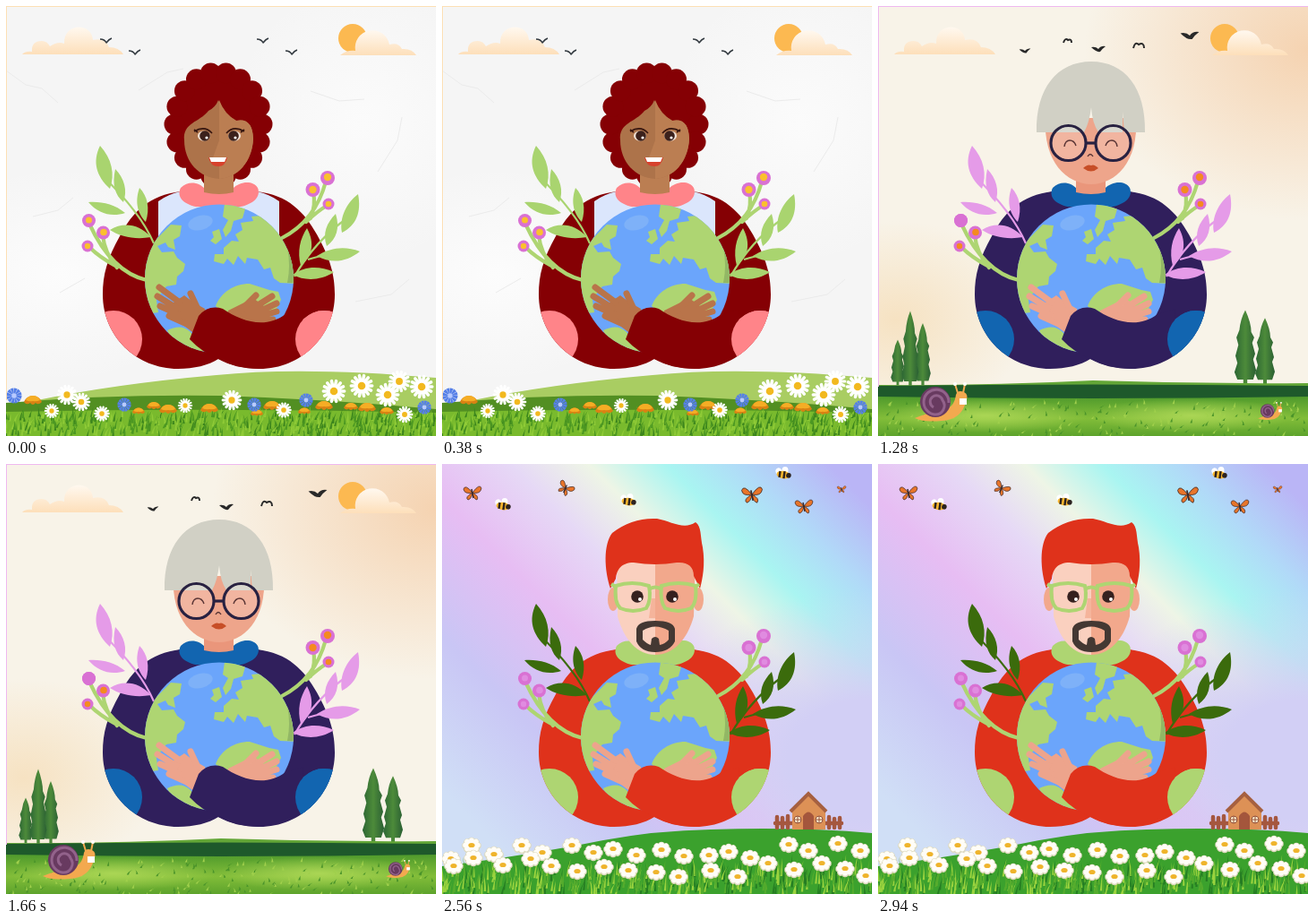
An HTML page that plays this animation: 480 by 480 pixels, repeating every 3.2 s.

```html
<!DOCTYPE html>
<html lang="en">
<head>
<meta charset="utf-8">
<title>Hugging the Earth</title>
<style>
html,body{margin:0;width:100%;height:100%;overflow:hidden}
svg{position:absolute;left:0;top:0}
.scene{width:480px;height:480px;opacity:0;animation:show 3.2s step-end infinite}
@keyframes show{0%{opacity:1}20%,100%{opacity:0}}
#s0{background:radial-gradient(170px 120px at 60px 300px,#fcfcfc,#fcfcfc00),radial-gradient(150px 160px at 400px 130px,#fbfbfb,#fbfbfb00),#f5f5f5;
 --body:#850004;--patch:#ff8489;--panel:#dbe6fc;--collar:#ff8489;--leaf:#a9d46f;--core:#fbc02d;--skin:#ad734a;--shade:#bb7e52;--hand:#b9744a}
#s1{animation-delay:-2.56s;background:radial-gradient(circle at 237px 20px,#fff 50px,#e4f2f4 130px,#b4dae0 220px,#86c3cd 310px,#60b0bd 420px);
 --body:#301f5c;--patch:#d6e4ff;--panel:#8eaab4;--collar:#d6e4ff;--leaf:#78a93a;--core:#f58a1f;--skin:#fad0bf;--shade:#f2ac90;--hand:#eda48c;--hair:#301f5c;--rim:#262a3b;--beard:#503a31}
#s2{animation-delay:-1.92s;background:radial-gradient(250px 190px at 480px 50px,#f5d3b1,#f5d3b100),radial-gradient(150px 110px at 20px 350px,#f6e2c2,#f6e2c200),#f8f3e8;
 --body:#301f5c;--patch:#1265b0;--panel:#301f5c;--collar:#1265b0;--leaf:#e59be8;--core:#f58a1f;--skin:#eea58b;--shade:#ea967b;--hand:#eda48c;--rim:#282141}
#s3{animation-delay:-1.28s;background:radial-gradient(270px 110px at 0 205px,#fdd0e4,#fdd0e400),radial-gradient(230px 120px at 430px 45px,#c2eee0,#c2eee000),radial-gradient(200px 130px at 480px 300px,#cbbcec,#cbbcec00),linear-gradient(175deg,#a8c6ec,#bcc6ee 42%,#dfd5f2 72%,#e8daf0);
 --body:#850004;--patch:#aed572;--panel:#d2521c;--collar:#aed572;--leaf:#3b6b0c;--core:#fbc02d;--skin:#eea58b;--shade:#ea967b;--hand:#eda48c;--rim:#87000c}
#s4{animation-delay:-.64s;background:radial-gradient(240px 190px at 470px 330px,#d2cff5 35%,#d2cff500),linear-gradient(45deg,#d0dff6 12%,#c9c6f5 30%,#e7bdf3 46%,#e6d9f6 58%,#eef5e6 67%,#a9f5f1 76%,#b1d9f8 85%,#bab5f6 95%);
 --body:#df321b;--patch:#aed572;--panel:#df321b;--collar:#aed572;--leaf:#3b6b0c;--core:#e08be0;--skin:#fad0bf;--shade:#f2a88c;--hand:#eda48c;--hair:#df321b;--rim:#aed572;--beard:#443833}
.body{fill:var(--body)}.patch{fill:var(--patch)}.panel{fill:var(--panel)}.collar{fill:var(--collar)}
.leaf{fill:var(--leaf)}.core{fill:var(--core)}.skin{fill:var(--skin)}.shade{fill:var(--shade)}
.hand{fill:var(--hand)}.fingers{fill:none;stroke:var(--hand);stroke-width:7;stroke-linecap:round}
.hair{fill:var(--hair)}.beard{fill:var(--beard)}
.rim{fill:none;stroke:var(--rim)}
.twig{fill:none;stroke:var(--leaf);stroke-width:2.2}
.stalk{fill:none;stroke:#aed572;stroke-width:4.2;stroke-linecap:round}
.berry{fill:#d971d3}
.gull{fill:none;stroke:#333a40;stroke-width:1.6;stroke-linejoin:round}
</style>
</head>
<body>
<svg width="0" height="0">
<defs>
<clipPath id="bodyClip"><path id="bodyShape" d="M195 207C160 211 141 230 127 257C113 282 108 300 108 322C108 369 146 405 192 405C210 405 226 401 237 394C250 401 264 405 283 405C330 405 367 368 367 322C367 300 362 282 347 255C333 230 315 211 280 207Z"/></clipPath>
<clipPath id="globeClip"><circle cx="238" cy="304.500" r="83"/></clipPath>
<linearGradient id="puff" x2="0" y2="1"><stop stop-color="#fff8ef"/><stop offset="1" stop-color="#fddfba"/></linearGradient>
<linearGradient id="lawnFill" x2="0" y2="1"><stop stop-color="#4f9a2c"/><stop offset=".55" stop-color="#82bd39"/><stop offset="1" stop-color="#5da32c"/></linearGradient>
<radialGradient id="glow"><stop stop-color="#b6dd5c" stop-opacity=".8"/><stop offset="1" stop-color="#b6dd5c" stop-opacity="0"/></radialGradient>
<linearGradient id="fir"><stop stop-color="#2c6634"/><stop offset=".5" stop-color="#4d8b3a"/><stop offset="1" stop-color="#2a5f33"/></linearGradient>

<g id="torso">
 <use href="#bodyShape" class="body"/>
 <g clip-path="url(#bodyClip)"><circle class="patch" cx="120" cy="372" r="32"/><circle class="patch" cx="355" cy="372" r="32"/></g>
 <path class="panel" d="M170 218Q181 210 195 207H280Q294 210 305 218V270H170Z"/>
 <path class="collar" d="M195 203C204 194 216 197 222 204Q238 211 253 204C262 195 276 195 281 203C285 213 276 221 262 224H212C198 221 190 213 195 203Z"/>
 <path class="shade" d="M221 185H254V208Q238 212 221 208Z"/>
</g>

<g id="hug">
 <path class="twig" d="M165 265Q150 230 108 190M130 231Q112 230 98 221M322 302Q345 262 382 236M337 283Q350 279 370 275"/>
 <path class="leaf" d="M105 156C96 174 101 190 116 204C122 188 118 170 105 156ZM122 182C118 200 122 211 131 219C136 206 132 192 122 182ZM92 219C106 218 121 221 133 231C118 236 103 232 92 219ZM149 203C143 220 148 233 156 241C161 226 158 212 149 203ZM116 250C131 241 148 243 162 258C145 261 128 258 116 250ZM393 210C397 230 391 245 375 253C372 236 380 220 393 210ZM368 232C373 248 369 260 358 268C353 254 358 242 368 232ZM395 274C380 286 363 288 347 279C363 269 379 268 395 274ZM336 248C345 265 342 280 329 290C325 274 328 260 336 248ZM366 297C351 307 333 307 320 300C334 290 350 290 366 297Z"/>
 <path class="stalk" d="M157 306Q118 297 93 243M108 256Q110 276 124 292M94 270Q104 280 122 290M308 259Q345 240 357 196M343 208Q346 222 340 237M358 223Q349 228 335 241"/>
 <g class="berry"><circle cx="92.500" cy="239.500" r="7.500"/><circle cx="108.500" cy="253" r="7.500"/><circle cx="91" cy="268" r="6.500"/><circle cx="359" cy="192" r="8"/><circle cx="342.500" cy="205" r="8"/><circle cx="360" cy="221" r="6.500"/></g>
 <g class="core"><circle cx="92.500" cy="239" r="3.500"/><circle cx="109" cy="252.500" r="3.800"/><circle cx="91" cy="268" r="3.200"/><circle cx="359" cy="191" r="4.200"/><circle cx="342.500" cy="205" r="4.200"/><circle cx="360" cy="221" r="3.300"/></g>
 <g clip-path="url(#globeClip)">
  <path fill="#6ba5fb" d="M150 215H325V392H150Z"/>
  <path fill="#aed572" d="M150 278L184 244L196 245L194 257L187 261L189 272L181 269L178 264L169 268L174 275L187 274L191 281L200 288L198 296L191 302L190 311L179 313L172 322L167 322L170 342L150 345Z
  M244 221L268 223L264 237L254 240L251 251L245 258L242 250L248 239L242 235ZM230 252L238 249L241 260L234 266L228 262L232 258Z
  M243 270L252 262L260 263L256 255L264 250L262 242L276 240L274 235L285 234L325 270V310L306 309L299 304L295 292L288 294L281 283L269 281L267 288L259 279L254 289L247 282L243 288L232 285L233 277L243 277Z
  M234 335C240 320 254 310 272 310L294 317L304 319L307 328L298 345L282 358L262 356L248 346ZM180 362Q196 354 206 364L223 385L206 388Q186 378 180 362Z"/>
  <ellipse cx="217" cy="242" rx="14" ry="8" fill="#7eb1f8" transform="rotate(-15 217 242)"/>
  <path fill="#92b765" d="M314 270Q318 290 314 309H325V270Z"/>
 </g>
 <path class="hand" d="M184 333L199 323L208 330L222 338L224 350L208 364Q190 352 184 333ZM248 340L276 326L292 338Q294 354 272 358L247 352Z"/>
 <path class="fingers" d="M171 314L194 331M169 324L190 337M172 335L192 344M182 346L202 355M206 321L214 338M297 324L270 341M302 332L272 346M302 341L272 350M298 350L268 354M279 323L262 340"/>
 <path class="body" d="M205 372L215 346Q226 333 242 338C262 352 290 361 312 344L332 338L330 390L283 405Q258 405 237 394Q218 386 205 372Z"/>
 <circle class="patch" cx="355" cy="372" r="32" clip-path="url(#bodyClip)"/>
</g>

<g id="openEyes"><g fill="#36211f"><circle cx="218" cy="148" r="6.800"/><circle cx="257" cy="148" r="6.800"/></g><g fill="#fff"><circle cx="221" cy="151" r="2"/><circle cx="260" cy="151" r="2"/></g></g>

<g id="man">
 <g class="shade"><ellipse cx="191" cy="151" rx="6" ry="13"/><ellipse cx="286" cy="151" rx="6" ry="13"/></g>
 <path class="skin" d="M195 104H238V213C218 213 203 196 196 170Z"/>
 <path class="shade" d="M238 104H283L281 170C274 196 258 213 238 213Z"/>
 <path class="hair" d="M188 139C181 118 180 90 190 77C205 65 222 60 240 61C256 64 270 74 283 65C290 70 288 80 291 93C294 112 291 128 288 139L281 125C281 114 274 109 262 110Q238 114 214 110C200 110 195 118 194 128Z"/>
 <use href="#openEyes"/>
 <path class="rim" stroke-width="4" d="M194 136Q212 130 231 136Q234 152 228 161Q213 167 199 161Q192 154 194 136ZM245 136Q264 130 283 136Q285 154 278 161Q264 167 249 161Q243 153 245 136ZM231 140Q238 135 245 140M189 134L195 138M287 134L282 138"/>
 <path class="shade" d="M234 150H238V172H231Z" opacity=".7"/>
 <path class="beard" fill-rule="evenodd" d="M217 184Q219 175 238 175Q258 175 260 184V198Q254 210 238 210Q222 210 217 198ZM224 186V196Q229 201 233 202L234 195Q238 191 242 195L243 202Q249 201 253 196V186Q238 177 224 186Z"/>
</g>

<path id="oval" class="skin" d="M187 125H288C291 174 265 199 238 199C211 199 184 174 187 125Z"/>
<g id="calm" fill="none">
 <g class="rim" stroke-width="3.200"><circle cx="212.500" cy="153" r="19.500"/><circle cx="262.500" cy="153" r="19.500"/><path d="M232 153H243"/></g>
 <g fill="#fff" opacity=".18"><circle cx="212.500" cy="153" r="18"/><circle cx="262.500" cy="153" r="18"/></g>
 <path stroke="#5a3535" stroke-width="1.400" d="M208 157Q209 150 214 150Q219 150 221 156M254 156Q256 150 261 150Q266 150 267 157M234 168Q237 163 240 168"/>
 <path fill="#c74e27" d="M229 181Q234 176 238 178Q241 176 246 181Q238 188 229 181Z"/>
</g>

<path id="cloud" fill="url(#puff)" d="M0 54Q4 50 11 51Q10 39 22 39Q28 39 31 45Q40 39 47 42C46 18 78 18 79 38Q93 35 97 46Q108 46 113 54Z"/>
<g id="dusk">
 <use href="#cloud" x="18"/>
 <circle cx="387" cy="36" r="16" fill="#fcb951"/>
 <path fill="url(#puff)" d="M373 55Q380 49 390 50A19 19 0 1 1 428 43Q438 40 442 48Q453 47 458 55Z"/>
</g>
<path id="gull" class="gull" d="M-7-2Q-2-2 0 2Q3-2 6-3"/>
<g id="gulls"><use href="#gull" x="287" y="39"/><use href="#gull" x="319" y="52"/></g>
<path id="crow" fill="#292929" d="M-8-2Q-3-3 0 0Q3-4 8-3Q4 0 2 3Q-2 4-8-2Z"/>

<g id="bee">
 <g fill="#fff"><ellipse cx="-3" cy="-5" rx="3.500" ry="4.500" transform="rotate(-25)"/><ellipse cx="2" cy="-5" rx="3.500" ry="4"/></g>
 <g transform="rotate(8)"><ellipse rx="7.500" ry="4.200" fill="#f9b62e"/><path stroke="#2c2320" stroke-width="2.400" d="M-4-3.500V3.500M1-4V4"/><circle cx="6" r="2.800" fill="#2c2320"/></g>
</g>
<g id="robin">
 <path fill="#54303a" d="M-28 9L-14 3Q-5-8 11-9Q22-12 24-4Q20 10 2 13Q-9 15-16 9L-27 14Z"/>
 <path fill="#7a3941" d="M7 2C0 4-12-2-17-14Q-4-13 4-8Z"/>
 <path fill="#d9533f" d="M14-9Q25-11 25-3Q21 9 10 10Q15 0 14-9Z"/><path fill="#eda02e" d="M24-8L29-6L24-4Z"/><circle cx="20" cy="-6" r="1.300" fill="#111"/>
</g>
<g id="moth"><path stroke="#3b2929" stroke-width=".7" d="M0 0Q-8-10-10-4Q-9 2 0 0Q-9 5-5 8Q-1 7 0 0Q8-11 10-5Q9 2 0 0Q8 4 5 8Q1 7 0 0Z"/><path stroke="#3b2929" stroke-width="1.500" d="M-1-4L1 6"/></g>

<g id="daisy"><path id="petals" stroke="#fff" stroke-width="2.700" stroke-linecap="round"/><circle r="3.300" fill="#f2b91f"/></g>
<g id="blossom" fill="none" stroke-linecap="round">
 <path id="bloom" stroke="#ddd9bd" stroke-width="7.500" d="M-7 0H7M0-5.500V5.500M-5-4L5 4M-5 4L5-4"/>
 <use href="#bloomTop"/><ellipse rx="3.600" ry="2.600" cy="-.5" fill="#efb42c"/>
</g>
<path id="bloomTop" stroke="#fffdf7" stroke-width="5.600" d="M-7-.5H7M0-6V5M-5-4.500L5 3.500M-5 3.500L5-4.500"/>
<g id="aster"><circle r="5.500" fill="none" stroke="#557fe8" stroke-width="8" pathLength="36" stroke-dasharray="2.600 .4"/><circle r="3" fill="#b8caff"/></g>
<g id="marigold"><path fill="#d98213" d="M-10 2Q-8-4 0-5Q8-4 10 2Q6 6 3 3Q0 7-3 3Q-7 6-10 2Z"/><path fill="#f5ad25" d="M-8 0Q-6-5 0-5Q6-5 8 0Q4 2 0 1Q-4 2-8 0Z"/></g>
<g id="meadow">
 <path fill="#a9cd62" d="M30 441Q120 422 235 412Q330 402 480 415V460H30Z"/>
 <path fill="#528f22" d="M0 443Q120 433 240 435Q360 439 480 450V480H0Z"/>
 <path fill="#79ba2d" d="M0 453Q240 448 480 454V480H0Z"/>
 <g id="meadowGrass"></g><g id="meadowFlowers"></g>
</g>

<g id="snail">
 <path fill="#f3a94f" d="M-30 18Q-10 10 4 8Q14 6 16-8Q18-14 25-11Q31-8 27 0Q22 20 0 21Q-20 23-30 18Z"/>
 <path stroke="#f3a94f" stroke-width="2" d="M18-10L15-20M24-10L26-20"/><g fill="#fff"><circle cx="15" cy="-20" r="2"/><circle cx="26" cy="-20" r="2"/></g>
 <circle cx="-7" cy="0" r="17" fill="#683a60"/><path fill="none" stroke="#92628b" stroke-width="3" d="M8 1A14 14 0 1 0-8 14A10 10 0 0 0 1-2A7 7 0 1 0-9 6"/>
 <path fill="#fff" d="M20-4H28V3H20Z"/>
</g>
<path id="tree" fill="url(#fir)" d="M0-80Q6-66 6-56L9-50L7-44L10-32L8-26L11-14L8-4H2V2H-2V-4H-8L-11-12L-8-22L-10-30L-7-42L-9-50L-6-58Q-5-70 0-80Z"/>

<g id="house">
 <path stroke="#a5573f" stroke-width="4.500" stroke-linecap="round" d="M-35 7V19M-29 8V19M-23 6V19M23 7V19M29 9V19M35 8V19M-37 14H-18M19 14H37"/>
 <path fill="#dd9156" d="M-18-1L0-19L19-1V21H-18Z"/>
 <path fill="none" stroke="#a66040" stroke-width="4" d="M-20 1L0-19L20 1"/>
 <path fill="#a4563c" d="M-6 21V6Q0-3 6 6V21Z"/>
 <g fill="#fff0d0" stroke="#93513a"><circle cx="-12" cy="10" r="4"/><circle cx="12" cy="10" r="4"/><path d="M-16 10H-8M-12 6V14M8 10H16M12 6V14"/></g>
</g>
</defs>
</svg>

<svg class="scene" id="s0" viewBox="0 0 480 480">
 <path fill="none" stroke="#ebebeb" d="M0 72L22 88L40 92L58 108M30 235L58 228L75 214M148 94L180 74L198 70M340 95L372 106L400 104M415 185L437 150L442 124M60 320L88 304M390 330L430 322L450 305"/>
 <use href="#dusk"/>
 <use href="#gulls"/><use href="#gulls" x="-175"/>
 <use href="#meadow"/>
 <g id="curls" fill="#850004"><ellipse cx="237" cy="132" rx="52" ry="61"/></g>
 <use href="#torso"/>
 <path class="skin" d="M199 150C197 130 216 130 226 117Q234 113 237 105Q244 121 257 128Q275 124 276 148C275 174 258 192 238 193C216 192 199 174 199 150Z"/>
 <path class="shade" d="M238 105Q244 121 257 128Q275 124 276 148C275 174 258 192 238 193V172H230L238 150Z"/>
 <g fill="#f3e4d8"><ellipse cx="221" cy="145" rx="7" ry="5.500"/><ellipse cx="255" cy="145" rx="7" ry="5.500"/></g>
 <g fill="#3b211c"><circle cx="222" cy="145" r="5.800"/><circle cx="254" cy="145" r="5.800"/></g><g fill="#fff"><circle cx="224" cy="147" r="1.600"/><circle cx="256" cy="147" r="1.600"/></g>
 <path fill="none" stroke="#35150f" stroke-width="1.600" d="M210 140Q222 133 230 142M246 142Q254 133 266 140M210 138L214 141M266 138L262 141"/>
 <path fill="#d7422d" d="M226 169H247Q245 179 237 179Q228 179 226 169Z"/><path fill="#fff" d="M227 169H246L244 174H229Z"/>
 <use href="#hug"/>
 <path fill="none" stroke="#fde0b5" stroke-width="2" d="M0 440V0H480"/>
</svg>

<svg class="scene" id="s1" viewBox="0 0 480 480">
 <use href="#bee" x="68" y="47"/><use href="#bee" x="208" y="42"/><use href="#bee" x="381" y="12"/>
 <use href="#robin" x="128" y="50"/><use href="#robin" transform="translate(452 27)scale(.5)"/>
 <g transform="translate(366 55)">
  <path id="rays" fill="#fbc64d" stroke="#e58a3e"/>
  <circle r="19" fill="#fdcf5d" stroke="#ec9f42"/>
  <g fill="#4b2c20"><circle cx="-7" cy="-2" r="1.800"/><circle cx="7" cy="-2" r="1.800"/></g><g fill="#f58c80"><circle cx="-11" cy="3" r="3"/><circle cx="11" cy="3" r="3"/></g><path d="M-3 1Q0 5 3 1" fill="none" stroke="#4b2c20"/>
 </g>
 <use href="#meadow"/><use href="#torso"/><use href="#man"/><use href="#hug"/>
</svg>

<svg class="scene" id="s2" viewBox="0 0 480 480">
 <use href="#dusk"/>
 <use href="#crow" transform="translate(164 50)scale(.8)"/><path d="M207 41Q209 35 212 38Q216 36 216 41M285 47Q287 39 291 43Q297 40 297 47" fill="none" stroke="#292929" stroke-width="2"/><use href="#crow" x="246" y="48"/><use href="#crow" transform="translate(348 33)scale(1.3)"/>
 <use href="#tree" transform="translate(22 422)scale(.7 .62)"/><use href="#tree" transform="translate(50 422)scale(.8 .85)"/><use href="#tree" transform="translate(36 423)scale(.85 1.030)"/>
 <use href="#tree" transform="translate(410 421)scale(1.100 1.020)"/><use href="#tree" transform="translate(432 421)scale(1 .91)"/>
 <path fill="#63a637" d="M0 423Q120 424 240 418Q360 422 480 421V440H0Z"/>
 <path fill="#1e592b" d="M0 424Q240 421 480 424V437Q240 440 0 437Z"/>
 <path fill="url(#lawnFill)" d="M0 436Q240 440 480 436V480H0Z"/>
 <ellipse cx="120" cy="457" rx="115" ry="19" fill="url(#glow)"/><ellipse cx="350" cy="457" rx="115" ry="19" fill="url(#glow)"/>
 <g id="lawnGrass"></g>
 <use href="#snail" transform="translate(71 442)"/><use href="#snail" transform="translate(438 452)scale(.46)"/>
 <use href="#torso"/><use href="#oval"/>
 <path fill="#d1d0c5" d="M177 141C176 92 200 62 238 62C276 62 299 92 298 141H275L273 118V141H246Q239 130 238 113Q236 130 230 141Z"/>
 <use href="#calm"/><use href="#hug"/>
 <circle class="berry" cx="92.500" cy="239.500" r="7.500"/>
 <path fill="none" stroke="#efb9f0" stroke-width="2" d="M0 425V0H480"/>
</svg>

<svg class="scene" id="s3" viewBox="0 0 480 480">
 <use href="#cloud" transform="translate(17 2)scale(.88 1)"/><use href="#cloud" transform="translate(362 2)scale(.88 1)"/>
 <use href="#gulls"/><use href="#gulls" x="-130"/>
 <use href="#moth" x="116" y="41" fill="#277ddb"/><use href="#moth" transform="translate(209 25)scale(.7)" fill="#d8472c"/><use href="#moth" transform="translate(344 51)scale(.75)" fill="#277ddb"/>
 <path fill="#c6d047" d="M0 441Q60 453 130 442L170 480H0Z"/>
 <path fill="#94b620" d="M0 461Q75 458 130 440Q205 410 300 408Q405 406 480 430V480H0Z"/>
 <g fill="#82a51c"><ellipse cx="344" cy="430" rx="20" ry="7"/><ellipse cx="310" cy="433" rx="8" ry="3"/><ellipse cx="275" cy="437" rx="12" ry="5"/><path d="M350 480Q410 432 480 445V480Z" opacity=".55"/></g>
 <use href="#house" x="382" y="398"/>
 <path id="tufts" fill="#329b68"/>
 <path fill="#e58a10" d="M177 150C174 95 195 62 238 62C281 62 300 95 298 150C303 183 325 188 319 222L305 245H170L157 222C149 192 174 186 177 150Z"/>
 <use href="#torso"/><use href="#oval"/>
 <path fill="#e58a10" d="M186 143C180 95 200 68 238 68C276 68 295 95 289 143L278 138L270 122L272 138H246Q240 126 238 111Q236 128 230 138H219L218 124L210 136Z"/>
 <use href="#calm"/><use href="#hug"/>
</svg>

<svg class="scene" id="s4" viewBox="0 0 480 480">
 <use href="#bee" x="68" y="47"/><use href="#bee" x="208" y="42"/><use href="#bee" x="381" y="12"/>
 <g fill="#e8752a"><use href="#moth" x="34" y="32"/><use href="#moth" transform="translate(138 27)rotate(35)scale(.9)"/><use href="#moth" transform="translate(346 34)scale(1.150)"/><use href="#moth" x="404" y="47"/><use href="#moth" transform="translate(446 28)scale(.5)"/></g>
 <path fill="#3ba12d" d="M0 449Q100 436 180 420Q240 409 300 408Q400 405 480 412V480H0Z"/>
 <use href="#house" x="409" y="387"/>
 <g id="fieldGrass"></g><g id="fieldFlowers"></g>
 <use href="#torso"/><use href="#man"/><use href="#hug"/>
</svg>

<script>
const el = id => document.getElementById(id);
let seed = 7;
const rnd = () => (seed = seed * 16807 % 2147483647) / 2147483647;
const range = (n, f) => Array.from({length: n}, (_, i) => f(i)).join('');

const blade = (x, y, h, w, lean) =>
  `M${x - w} ${y}Q${x} ${y - h / 2} ${x + lean} ${y - h}Q${x + w} ${y - h / 2} ${x + w} ${y}Z`;

const grass = (id, count, top, height, colors) => {
  el(id).innerHTML = colors.map(c => `<path fill="${c}" d="${range(count, () =>
    blade(rnd() * 480, top + rnd() * (484 - top), height * (.5 + rnd() / 2), 1.2, rnd() * 9 - 3))}"/>`).join('');
};

// Each spot is "x,y" or "x,y,scale".
const plant = (id, kind, spots) => {
  el(id).innerHTML += spots.split(' ').map(s => {
    const [x, y, k = 1] = s.split(',');
    return `<use href="#${kind}" transform="translate(${x} ${y})scale(${k})"/>`;
  }).join('');
};

el('curls').innerHTML += range(18, i => {
  const a = i * Math.PI / 9;
  return `<circle cx="${237 + 49 * Math.cos(a)}" cy="${132 + 58 * Math.sin(a)}" r="11.5"/>`;
});

el('petals').setAttribute('d', range(7, i => {
  const x = 9 * Math.cos(i * Math.PI / 7), y = 9 * Math.sin(i * Math.PI / 7);
  return `M${-x} ${-y}L${x} ${y}`;
}));

el('rays').setAttribute('d', 'M' + Array.from({length: 24}, (_, i) => {
  const r = i % 2 ? 19 : 28, a = i * Math.PI / 12 - 1.57;
  return `${r * Math.cos(a)} ${r * Math.sin(a)}`;
}).join('L') + 'Z');

el('tufts').setAttribute('d', [34, 87, 104, 135, 161, 222, 253, 286, 376, 414, 431, 452, 476].map((x, i) => {
  const h = [22, 18, 12, 42, 28][i % 5];
  return blade(x, 480, h, 3, -4) + blade(x + 4, 480, h * .8, 3, 8) + blade(x - 4, 480, h * .55, 2, -7);
}).join(''));

grass('meadowGrass', 170, 458, 15, ['#3c851d', '#8fcb37', '#4c9822']);
grass('lawnGrass', 110, 444, 6, ['#4b942a', '#a0d04c']);
grass('fieldGrass', 170, 458, 24, ['#257d22', '#9ad33e', '#55ac2d']);

plant('meadowFlowers', 'marigold', '30,440 165,446,.8 181,450 227,449 297,446 355,446 385,447,.8 403,448 148,452,.7 280,454,.7 333,452,.7 425,452,.8');
plant('meadowFlowers', 'aster', '9,435,.9 132,445,.8 277,445,.8 335,440,.8 467,448,.8');
plant('meadowFlowers', 'daisy', '68,434,1.1 84,442 51,452,.8 107,455,.85 200,446,.8 252,440,1.1 310,451,.85 366,430,1.3 397,424,1.3 439,419,1.2 426,434,1.3 464,425,1.3 445,456,.9');
plant('fieldFlowers', 'blossom', '33,426 89,426 145,426 191,430 245,431 320,433 387,425 409,432 442,424 467,432 10,441 35,440 58,436 112,434 169,434 217,437 270,438 298,437 344,440 364,446 68,448 99,441 122,449 151,455 181,450 208,454 239,456 264,461 300,454 330,461 393,453 424,446 450,452 473,460 13,449');
</script>
</body>
</html>
```
